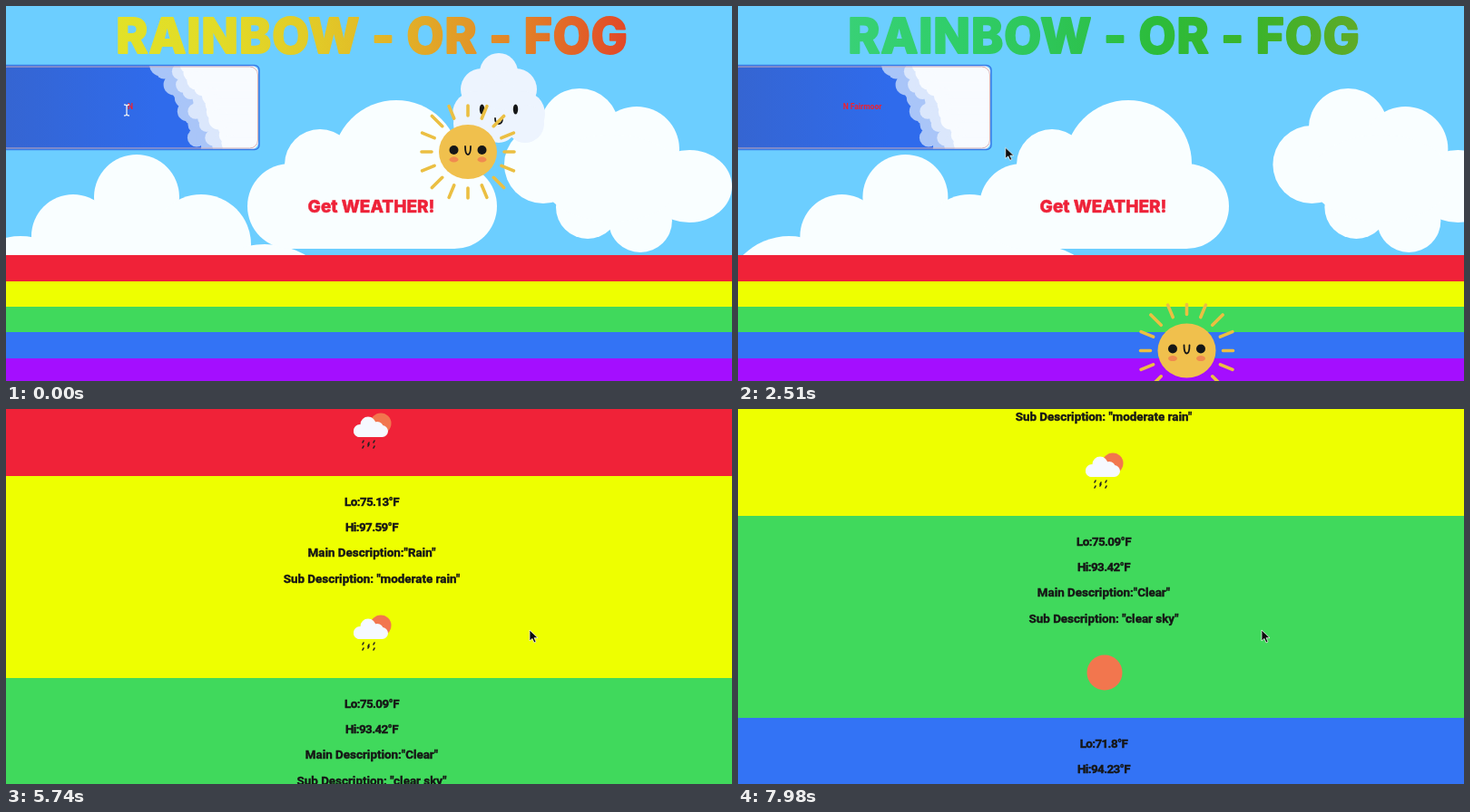
An HTML page for the animation above (8000 ms loop, 800 by 414 pixels).

```html
<!DOCTYPE html>
<html lang="en">
<head>
<meta charset="utf-8">
<title>Forecast page</title>
<style>
  html, body { margin: 0; width: 100%; height: 100%; overflow: hidden; background: #6cceff; }
  svg { display: block; width: 800px; height: 414px; }
  text { text-anchor: middle; white-space: pre; }
  .title { font: 800 53px Inter, sans-serif; letter-spacing: 1px; stroke-width: 2; stroke-linejoin: round; }
  .button { font: 800 19px Inter, sans-serif; fill: #ee2238; stroke: #ee2238; stroke-width: .5; stroke-linejoin: round; }
  .city { font: 700 8.5px Roboto, sans-serif; fill: #f0202c; }
  .day { font: 700 13.4px Roboto, sans-serif; fill: #161616; stroke: #161616; stroke-width: .4; }
  .temp { letter-spacing: -.6px; }
  .first { fill: #f2cb50; stroke: #f2cb50; letter-spacing: 2.35px; }
  .line { fill: none; stroke-linecap: round; }
</style>
</head>
<body>
<svg id="stage" viewBox="0 0 800 414"></svg>
<script>
// Times are in seconds.
const LOOP = 8, STEP = .1475, LOADED = 2.94;
const SKY_END = 275, DAY_HEIGHT = 223, STRIPE = 28.4;
const CITY = 'N Fairmoor';
const CLOUD = '#f9feff', INK = '#151617', CORAL = '#f2764e';

const days = [
  { color: '#f02238', lo: '74.3', hi: '75.54', main: 'Rain', sub: 'moderate rain' },
  { color: '#eeff00', lo: '75.13', hi: '97.59', main: 'Rain', sub: 'moderate rain' },
  { color: '#40d95c', lo: '75.09', hi: '93.42', main: 'Clear', sub: 'clear sky' },
  { color: '#3373f5', lo: '71.8', hi: '94.23', main: 'Rain', sub: 'heavy intensity rain' },
  { color: '#a40eff', lo: '69.08', hi: '84.99', main: 'Rain', sub: 'moderate rain' }
];

const range = n => [...Array(n).keys()];
const rect = (x, y, w, h, fill) => `<rect x="${x}" y="${y}" width="${w}" height="${h}" fill="${fill}"/>`;
const oval = (x, y, rx, ry = rx, fill = 'inherit') =>
  `<ellipse cx="${x}" cy="${y}" rx="${rx}" ry="${ry}" fill="${fill}"/>`;
const pair = (x, ...rest) => oval(-x, ...rest) + oval(x, ...rest);
const smile = (y, w, h) => `<path class="line" stroke="${INK}" stroke-width="1.8"
  d="M${-w} ${y}Q${-w} ${y + h} 0 ${y + h}T${w} ${y}"/>`;

function rays(count) {
  const path = range(count).map(i => {
    const a = i / count * 2 * Math.PI, outer = 51 + 5 * Math.abs(Math.sin(2 * a));
    return `M${Math.cos(a) * 40} ${Math.sin(a) * 40}L${Math.cos(a) * outer} ${Math.sin(a) * outer}`;
  }).join('');
  return `<path class="line" d="${path}" stroke="#ebbf42" stroke-width="3.6"/>`;
}

const sun = `<g id="sun">${rays(16)}${oval(0, 0, 32, 30, '#f0c04d')}
  ${pair(15.5, 8.5, 5, 3, '#f08a50')}${pair(15.5, -2, 5, 5, INK)}${smile(-6, 3, 9)}</g>`;

const puff = `<g id="puff" fill="#edf4fe">
  ${oval(0, -28, 21)}${pair(19, -9, 23)}${pair(26, 18, 25)}${pair(29, 29, 21)}${oval(0, 10, 28)}${oval(0, 31, 19)}
  ${pair(18.5, 13, 2.7, 5.5, INK)}${smile(23, 4, 6)}</g>`;

const driftingClouds = `<g id="clouds" fill="${CLOUD}">
  ${oval(16, 326, 72)}${oval(74, 254, 46)}${oval(144, 211, 47)}${oval(215, 263, 55)}${oval(285, 353, 90)}
  ${rect(74, 245, 186, 32, CLOUD)}
  ${oval(592, 175, 43)}${oval(632, 134.5, 43.5)}${oval(695, 158, 47)}${oval(753, 199, 47, 40)}
  ${oval(641, 222, 35)}${oval(699, 237, 35)}${oval(668, 190, 78, 48)}</g>`;

const button = `<g fill="${CLOUD}">
  ${oval(346, 175, 39)}${oval(430, 174, 70)}
  <rect x="266" y="174" width="275" height="94" rx="47"/></g>
  <text class="button" x="402.5" y="228">Get WEATHER!</text>`;

// Soft puffs: pale blue near the slanted edge, white farther right.
function skyPhoto() {
  let seed = 7;
  const random = () => (seed = seed * 16807 % 2147483647) / 2147483647;
  const puffs = (count, inset, fill) => range(count).map(i => {
    const y = 65 + i / (count - 1) * 95;
    const x = 162 + inset + (y - 65) * .5 + random() * 14, r = 7 + random() * 6;
    return oval(x + r, y, r, r, fill) + rect(x + r, y - 6, 120, 12, fill);
  }).join('');
  return rect(0, 65, 280, 95, 'url(#boxSky)') + puffs(14, -4, '#a9c5f8') + puffs(14, 12, '#dbe7fc') + puffs(12, 24, '#f8fbff');
}

const searchBox = `<g clip-path="url(#boxClip)">${skyPhoto()}</g>
  <rect x="-8" y="67" width="285.5" height="90" rx="9" fill="none" stroke="#d9b0b4"/>
  <rect x="-8" y="65.5" width="287" height="93" rx="5" fill="none" stroke="#397be8" stroke-width="1.5"/>
  <text class="city" id="city" x="137" y="114"></text>`;

function weatherIcon(kind) {
  if (kind === 'Clear') return oval(404, 173, 19.5, 19.5, CORAL);
  const drops = range(6).map(i => `M${394 + i % 3 * 6} ${184 + i % 2 * 2 + (i > 2) * 4}l-1 2`).join('');
  return `${oval(413, 165, 11.5, 11.5, CORAL)}
    <g fill="#f6f9ff">${oval(390, 173, 7)}${oval(399, 166, 8.5)}${oval(409, 170, 7)}
    <rect x="383" y="167" width="38" height="13" rx="6.5"/></g>
    <path class="line" d="${drops}" stroke="#222" stroke-width="1.6"/>`;
}

function dayPanel(day, i) {
  const lines = [`Lo:${day.lo}°F`, `Hi:${day.hi}°F`,
    `Main Description:"${day.main}"`, `Sub Description: "${day.sub}"`];
  const rows = lines.map((line, n) => {
    const look = i === 0 ? 'first' : n < 2 ? 'temp' : '';
    return `<text class="day ${look}" x="403" y="${33 + n * 28.2}">${line}</text>`;
  }).join('');
  return `<g transform="translate(0 ${SKY_END + i * DAY_HEIGHT})">
    ${rect(0, 0, 800, DAY_HEIGHT, day.color)}${rows}${weatherIcon(day.main)}</g>`;
}

const stripe = (day, i) => rect(0, Math.round(SKY_END + .2 + i * STRIPE), 800, 30, day.color);

const stage = document.getElementById('stage');
stage.innerHTML = `<defs>
    <linearGradient id="rainbow" gradientUnits="userSpaceOnUse" x1="120" x2="687" y1="0" y2="0">
      ${range(6).map(i => `<stop offset="${i / 5}"/>`).join('')}</linearGradient>
    <linearGradient id="boxSky"><stop offset="0" stop-color="#3565d2"/>
      <stop offset=".6" stop-color="#2f6bec"/></linearGradient>
    <clipPath id="boxClip"><rect x="-8" y="66" width="286" height="92" rx="8"/></clipPath>
  </defs>
  ${rect(0, 0, 800, 414, '#6cceff')}
  <g id="page">
    <text class="title" x="403.5" y="51.5" fill="url(#rainbow)" stroke="url(#rainbow)">RAINBOW - OR - FOG</text>
    ${driftingClouds}${button}${searchBox}
    <g id="stripes">${days.map(stripe).join('')}</g>
    <g id="forecast">${days.map(dayPanel).join('')}</g>
    ${puff}${sun}
  </g>
  <g id="mouse">
    <path id="arrow" d="M0 0V12L3 9.500L5 14L7 13L5 8.700H9Z" fill="#0b0b0b" stroke="#fff" stroke-width=".7"/>
    <path id="beam" class="line" d="M-2.500 -6Q0 -6 0 -4Q0 -6 2.500 -6M0 -4V4M-2.500 6Q0 6 0 4Q0 6 2.500 6"
      stroke="#e8eef4" stroke-width="1.300"/>
  </g>`;

const el = id => document.getElementById(id);
const stops = [...stage.querySelectorAll('#rainbow stop')];
const move = (id, x, y) => el(id).setAttribute('transform', `translate(${x} ${y})`);
const show = (id, on) => el(id).setAttribute('visibility', on ? 'visible' : 'hidden');

const ramp = (t, from, to) => Math.min(1, Math.max(0, (t - from) / (to - from)));
const smooth = p => p * p * (3 - 2 * p);
const bounce = (v, wall) => wall + Math.abs(v - wall);

const drift = t => 40.7 * (Math.sin(.45 * t - .945) + .81);
const scroll = t => 421 * ramp(t, 3.87, 5.75) + 555 * ramp(t, 5.75, 6.19) - 373 * ramp(t, 7.3, 7.965);

// The small cloud rebounds once from the lower left.
const puffAt = t => [bounce(543 - 139.5 * t, 81), -bounce(-101 - 163 * t, -660)];

// The sun sinks out of view, then climbs back on the left.
function sunAt(t) {
  const sink = ramp(t, 1.62, 3.5), rise = ramp(t, 3.5, 4.72);
  return [509 + 70 * ramp(t, 0, 1.62) - 179 * sink - 193 * rise,
          161 + 59 * ramp(t, 0, 1.62) + 340 * sink - 302 * rise];
}

function mouseAt(t) {
  const toButton = smooth(ramp(t, 1.8, 3.4)), toPage = ramp(t, 3.69, 4.72);
  return [133 + 391 * toButton + 53 * toPage, 115 + 100 * toButton + 29 * toPage];
}

function titleColor(x, t) {
  const sway = Math.sin(Math.PI * t / 4.6);
  return `hsl(${60 + 85 * sway - 50 * x * x}, ${76 - 14 * sway}%, ${52 - 11 * x * sway}%)`;
}

function render(now) {
  // The picture refreshes about seven times a second.
  const t = Math.floor((now % LOOP + .015) / STEP) * STEP;
  const [x, y] = mouseAt(t);
  const overBox = x < 279 && y < 158;

  move('page', 0, -Math.round(scroll(t)));
  move('clouds', drift(t), 0);
  move('sun', ...sunAt(t));
  move('puff', ...puffAt(t));
  move('mouse', x, y);
  show('beam', overBox);
  show('arrow', !overBox);
  show('stripes', t < LOADED);
  show('forecast', t >= LOADED);
  el('city').textContent = CITY.slice(0, 1 + Math.floor((CITY.length - 1) * ramp(t, 0, 1.3)));
  stops.forEach((stop, i) => stop.setAttribute('stop-color', titleColor(i / 5, t)));
}

const start = performance.now();
function tick() {
  render((performance.now() - start) / 1000);
  requestAnimationFrame(tick);
}
tick();
</script>
</body>
</html>
```
